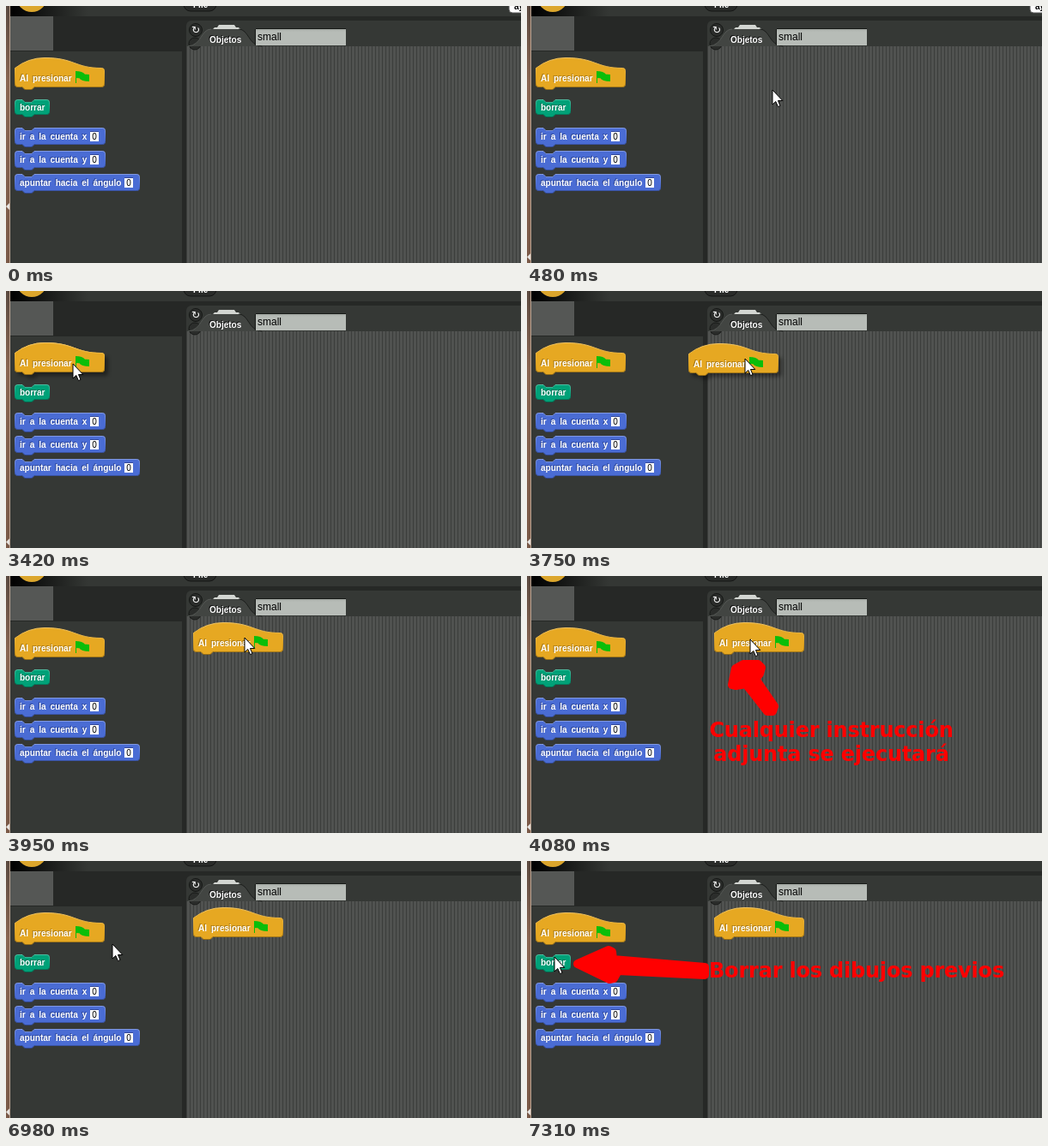
Write an HTML page that moves like this. It is 600 px wide and 300 px high and loops after 8 s.

```html
<!DOCTYPE html>
<html lang="es">
<head>
<meta charset="utf-8">
<style>
html, body { margin: 0; width: 100%; height: 100%; overflow: hidden; background: #232523; }
svg { display: block; }
text { font: bold 10px "Liberation Sans", Arial, sans-serif; white-space: pre; }
.label { word-spacing: 2.2px; }
.plain { font-weight: normal; }
.note { fill: red; }
.note path { stroke: red; stroke-width: 10; stroke-linejoin: round; }
.note text { font: bold 24px "DejaVu Sans", Verdana, sans-serif; letter-spacing: -.2px; }
.lifted { filter: drop-shadow(4px 4px 2px rgba(0,0,0,.4)); }
</style>
</head>
<body>
<svg id="stage" width="600" height="300" viewBox="0 0 600 300">
  <defs>
    <pattern id="stripes" x="210" width="4" height="4" patternUnits="userSpaceOnUse">
      <rect width="4" height="4" fill="#505250"/><rect width="1" height="4" fill="#3b3d3b"/>
    </pattern>
    <linearGradient id="bevel" x2="0" y2="1">
      <stop stop-color="#fff" stop-opacity=".3"/><stop offset=".4" stop-color="#fff" stop-opacity=".1"/>
      <stop offset=".7" stop-opacity=".1"/><stop offset="1" stop-opacity=".35"/>
    </linearGradient>
    <linearGradient id="fade"><stop/><stop offset="1" stop-color="#343734"/></linearGradient>
    <linearGradient id="wood" x2="0" y2="1"><stop stop-color="#5b4a40"/><stop offset=".3" stop-color="#8a6652"/><stop offset="1" stop-color="#7a5947"/></linearGradient>
    <linearGradient id="field" x2="0" y2="1"><stop stop-color="#9ca19c"/><stop offset=".2" stop-color="#b7bcb7"/></linearGradient>
  </defs>

  <rect width="600" height="300" fill="#262826"/>
  <rect x="5" width="595" height="12" fill="#343734"/>
  <rect x="5" width="90" height="12" fill="url(#fade)"/>
  <circle cx="30" cy="-11" r="18" fill="#dca62c"/>
  <rect x="207" y="-14" width="38" height="20" rx="8" fill="#292b29" stroke="#151615"/>
  <text x="218" y="2" fill="#fff">File</text>
  <g id="bubble">
    <rect x="586" y="-12" width="30" height="20" rx="4" fill="#fff" stroke="#555"/>
    <text x="592" y="4">ay</text>
  </g>

  <rect x="5" y="12" width="50" height="40" fill="#555755"/>
  <rect x="5" y="53" width="200" height="247" fill="#353835"/>
  <path d="M210 47V23a6 6 0 0 1 6-6H600V47Z" fill="#353835"/>
  <rect x="210" y="47" width="390" height="253" fill="url(#stripes)"/>

  <circle cx="220" cy="44" r="7" fill="#2b2d2b" stroke="#181a18"/>
  <path d="M240 28L243 25H246L248 22H266L268 25H271L274 28Z" fill="#d3d6d2"/>
  <path d="M212 47C228 46 227 27 239 27H271C283 27 282 46 298 47Z" fill="#424542"/>
  <path d="M212 47C228 46 227 27 239 27" fill="none" stroke="#555855"/>
  <path d="M271 27C283 27 282 46 298 47" fill="none" stroke="#1c1e1c"/>
  <circle cx="221" cy="28" r="7.5" fill="#2b2d2b" stroke="#151715"/>
  <text x="221" y="32" fill="#fff" text-anchor="middle" style="font:12px 'DejaVu Sans',sans-serif">↻</text>
  <text x="236" y="42" fill="#111">Objetos</text>
  <text x="237" y="43" fill="#fff">Objetos</text>

  <rect x="290" y="26" width="106" height="20" fill="url(#field)"/>
  <path d="M290.5 46V26.5H396" fill="none" stroke="#171917"/>
  <text class="plain" x="293" y="40" style="font-size:12px">small</text>

  <rect width="4" height="300" fill="url(#wood)"/>
  <rect x="4" width="1" height="300" fill="#bda593"/>
  <path id="pointer" d="M0 0L4-4V4Z" fill="#e8e4e0"/>
  <g id="palette"></g>
  <g id="copy"></g>

  <g class="note">
    <path d="M123 84L136 66L145 66L147 80L202 81V91L146 91L139 101L133 101Z"/>
    <text x="206.5" y="95">Empieza el programa</text>
  </g>
  <g class="note">
    <path d="M239 127L243 108L252 103H269L273 107L271 114L266 120L288 152L286 158L280 158L255 126L243 128Z"/>
    <text x="354.5" y="188" text-anchor="middle">Cualquier instrucción</text>
    <text x="354.5" y="216" text-anchor="middle">adjunta se ejecutará</text>
  </g>
  <g class="note">
    <path d="M59 120L95 104L99 106L100 115L207 124V133L106 128L101 137L96 138Z"/>
    <text x="212" y="136">Borrar los dibujos previos</text>
  </g>
  <path id="cursor" d="M0 0V17L3.8 13.5L6.5 19.7L9 18.5L6.5 12.5H11.8Z" fill="#fff" stroke="#000"/>
</svg>
<script>
const $ = id => document.getElementById(id);
const notes = document.querySelectorAll('.note');

// Outlines sit half a pixel inside the block so the bevel stays within it
const base = (w, h) => `a3 3 0 0 1 3 3V${h - 3.5}a3 3 0 0 1-3 3H23l-3 3h-8l-3-3H3.5a3 3 0 0 1-3-3Z`;
const command = (w, h) => `M.5 3.5a3 3 0 0 1 3-3H9l3 3h8l3-3H${w - 3.5}` + base(w, h);
const hat = (w, h) => `M.5 12.5A57 57 0 0 1 35 .5C70 .5 70 12.5 ${w - 3.5} 12.5` + base(w, h);

function block(shape, x, y, w, h, color, shade, label, baseline, extra = '') {
  return `<g transform="translate(${x} ${y})">
    <path d="${shape(w, h)}" fill="${color}" stroke="${color}"/>
    <path d="${shape(w, h)}" fill="none" stroke="url(#bevel)"/>
    <text class="label" x="5" y="${baseline - 1}" fill="${shade}">${label}</text>
    <text class="label" x="6" y="${baseline}" fill="#fff">${label}</text>${extra}</g>`;
}

const flag = `<path d="M71 20C84 20 73 24 87 24" fill="none" stroke="#0abe0a" stroke-width="8"/>
  <path d="M71.5 16V30" stroke="#0abe0a"/>`;
const start = (x, y) => block(hat, x, y, 105, 35, '#e6a822', '#a87a18', 'Al presionar', 28, flag);
const motion = (y, w, label) => block(command, 10, y, w, 20, '#4a6cd4', '#2f4796', label, 14,
  `<rect x="${w - 18}" y="5" width="10" height="11" fill="#fff"/>
   <path d="M${w - 18} 4.5H${w - 8}" stroke="#34499a"/>
   <text class="plain" x="${w - 13}" y="14" text-anchor="middle">0</text>`);

$('palette').innerHTML = start(10, 60) +
  block(command, 10, 109, 41, 18, '#00a178', '#006e52', 'borrar', 13) +
  motion(142, 106, 'ir a la cuenta x') +
  motion(169, 106, 'ir a la cuenta y') +
  motion(196, 146, 'apuntar hacia el ángulo');
$('copy').innerHTML = start(0, 0);

// Keys are [progress, x, y]
function along(keys, u) {
  let i = 1;
  while (i < keys.length - 1 && u > keys[i][0]) i++;
  const [a, b] = [keys[i - 1], keys[i]];
  const f = Math.min(1, Math.max(0, (u - a[0]) / (b[0] - a[0])));
  return [a[1] + (b[1] - a[1]) * f, a[2] + (b[2] - a[2]) * f];
}
// Progress in equal jumps, as in a screen recording
const stepped = (t, from, to, jumps) =>
  Math.min(1, Math.max(0, Math.floor((t - from) / (to - from) * jumps + 1e-6) / jumps));
const ease = u => u * u * (3 - 2 * u);

const enter = [[0, 592, 170], [.4, 380, 110], [.8, 110, 76], [1, 57, 74]];
const drag = [[0, 78, 85], [.5, 254, 79], [.72, 284, 72], [1, 260, 74]];
const carry = [[0, 10, 60], [.5, 188, 61], [.72, 218, 54]];
const leave = [[0, 233, 79], [1, 32, 112]];

function cursorAt(t) {
  if (t < 920) return along(enter, ease(stepped(t, 40, 820, 19)));
  if (t < 3420) return [65, 81];
  if (t < 6580) return along(drag, stepped(t, 3420, 4080, 14));
  return along(leave, ease(stepped(t, 6580, 7310, 17)));
}
const place = (el, [x, y]) => el.setAttribute('transform', `translate(${Math.round(x)} ${Math.round(y)})`);
const show = (el, on) => { el.style.display = on ? '' : 'none'; };

function draw() {
  const t = performance.now() % 8000;
  const lift = stepped(t, 3420, 4080, 14);
  show($('cursor'), t >= 40);
  place($('cursor'), cursorAt(t));
  place($('pointer'), [0, t < 40 ? 234 : 293]);
  show($('bubble'), t < 3420);
  show($('copy'), t >= 3420);
  place($('copy'), along(carry, lift));
  $('copy').classList.toggle('lifted', lift < .72);
  [[920, 3420], [4080, 6580], [7310, 8000]].forEach(([from, to], i) => show(notes[i], t >= from && t < to));
  requestAnimationFrame(draw);
}
draw();
</script>
</body>
</html>
```
